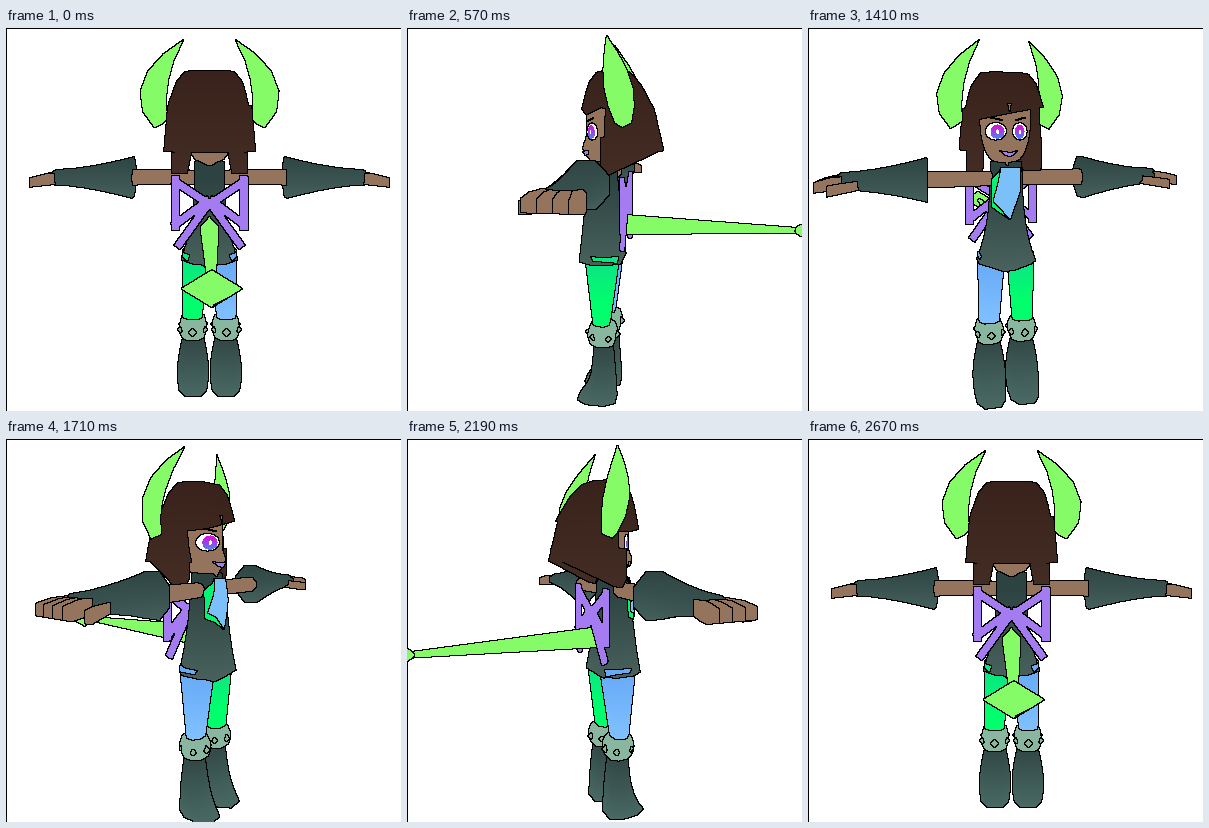
Animation of 395x383 px, one loop 2700 ms. Source, as an HTML page with a canvas:

```html
<!DOCTYPE html>
<html lang="en">
<head>
<meta charset="utf-8">
<title>Turntable</title>
<style>
html, body { margin: 0; width: 100%; height: 100%; overflow: hidden; background: #fff; }
canvas { display: block; width: 395px; height: 383px; }
</style>
</head>
<body>
<canvas id="stage" width="395" height="383"></canvas>
<script>
const W = 395, H = 383, STEPS = 45, STEP_MS = 60;
const AXIS = 200.7, HORIZON = 110, DISTANCE = 450;
const OFFSET = { x: 3.2, z: 5 };
const SIDES = [-1, 1];

const rgb = hex => [1, 3, 5].map(i => parseInt(hex.slice(i, i + 2), 16));
const lerp = (a, b, t) => a + (b - a) * t;
const clamp = t => Math.min(1, Math.max(0, t));
const steps = (n, f) => Array.from({ length: n + 1 }, (_, i) => f(i / n));

// ---- Paints: vertical gradients in model space ----
const paints = [];
function paint(top, bottom = top, y0 = 0, y1 = 1) {
  return paints.push({ top: rgb(top), bottom: rgb(bottom), y0, y1 }) - 1;
}
const SKIN = paint('#94745c');
const HAIR = paint('#38221b', '#432c23', 45, 140);
const LIME = paint('#86fb68');
const TEAL = paint('#2d4341', '#49625d', 150, 235);
const CUFF = paint('#2f4644', '#47625e', 130, 172);
const BOOT = paint('#324846', '#4b6c66', 308, 366);
const GREEN = paint('#0ce484', '#00ff6c', 228, 268);
const BLUE = paint('#68aaf6', '#80c2ff', 228, 290);
const CHEST_GREEN = paint('#00f572');
const CHEST_BLUE = paint('#7cc0fa');
const METAL = paint('#88b69e');
const PURPLE = paint('#a57bf2');
const WHITE = paint('#ffffff');
const IRIS = paint('#d317dc', '#4a86f2', 99, 110);
const INK = paint('#000000');

// ---- Mesh building ----
const mesh = [];
let part = 0;

function add(color, ...pts) {
  mesh.push({ color, part, pts });
}

function loft(color, rings, { separate = true, capped = true } = {}) {
  if (separate) part++;
  for (let r = 1; r < rings.length; r++) {
    const a = rings[r - 1], b = rings[r];
    a.forEach((p, i) => {
      const j = (i + 1) % a.length;
      add(color, p, a[j], b[i]);
      add(color, a[j], b[j], b[i]);
    });
  }
  if (!capped) return;
  for (const ring of [rings[0], rings[rings.length - 1]]) {
    for (let i = 2; i < ring.length; i++) add(color, ring[0], ring[i - 1], ring[i]);
  }
}

const sweep = (color, n, ringAt, options) => loft(color, steps(n, ringAt), options);

// Horizontal octagon
function slab(y, w, front, back, cx = 0, flat = .55) {
  const f = lerp(back, front, .72), b = lerp(back, front, .28), n = w * flat;
  return [[n, front], [w, f], [w, b], [n, back], [-n, back], [-w, b], [-w, f], [-n, front]]
    .map(([x, z]) => [cx + x, y, z]);
}

// Octagon across a limb that runs along x
function limb(x, ry, rz) {
  return steps(7, t => {
    const a = (t * 7 + .5) * Math.PI / 4;
    return [x, 150 + ry * 1.06 * Math.sin(a), rz * 1.06 * Math.cos(a)];
  });
}

// Diamonds across a vertical and a depth axis
const flatDiamond = (x, y, z, r) => [[x + r, y, z], [x, y, z + r], [x - r, y, z], [x, y, z - r]];
const uprightDiamond = (z, rx, ry) => [[rx, 197, z], [0, 197 + ry, z], [-rx, 197, z], [0, 197 - ry, z]];

const box = (x, y0, y1, z0, z1) => [[x, y0, z0], [x, y1, z0], [x, y1, z1], [x, y0, z1]];

// Lays a flat outline over a surface, finely enough to follow its bends
function decal(color, outline, surface, lift, separate = true) {
  const dense = outline.flatMap(([x, y], i) => {
    const [nx, ny] = outline[(i + 1) % outline.length];
    return steps(3, t => [lerp(x, nx, t * .75), lerp(y, ny, t * .75)]);
  });
  const middle = axis => outline.reduce((sum, p) => sum + p[axis], 0) / outline.length;
  const cx = middle(0), cy = middle(1);
  sweep(color, 4, t => dense.map(p => {
    const x = lerp(cx, p[0], t), y = lerp(cy, p[1], t);
    return [x, y, surface(x, y) + lift];
  }), { separate, capped: false });
}

const ellipse = (cx, cy, rx, ry) => steps(11, t => {
  const a = t * 11 / 6 * Math.PI;
  return [cx + rx * Math.cos(a), cy + ry * Math.sin(a)];
});

// Torso and chest
const torsoAt = y => {
  const t = clamp((y - 134) / 97);
  return { w: 15 + 13 * t ** 3, front: 9 + 11 * t ** .6, back: -12 - 9 * t };
};
const torsoRing = y => {
  const { w, front, back } = torsoAt(y);
  return slab(y, w, front, back, 0, .7);
};
loft(TEAL, [...steps(8, t => torsoRing(lerp(134, 231, t))), slab(239, 10, 10, -10)]);
const chestZ = (x, y) => {
  const { w, front, back } = torsoAt(y);
  return lerp(front, lerp(back, front, .72), clamp((Math.abs(x) / w - .7) / .3));
};
decal(CHEST_GREEN, [[16, 150], [7, 139], [0, 140], [0, 188], [16, 177]], chestZ, 1.5);
decal(CHEST_BLUE, [[8, 139], [-11, 139], [-11, 160], [0, 188], [15, 171]], chestZ, 3);

// Face: a wedge that bulges at the mouth and narrows to the chin
const faceAt = y => {
  const t = clamp((y - 78) / 59);
  const muzzle = Math.exp(-(((t - .73) / .13) ** 2));
  return { w: 4 + 22 * Math.sqrt(1 - t ** 3), front: 17 + 5 * muzzle - 6 * t ** 6, side: -3 };
};
const faceZ = (x, y) => {
  const { w, front, side } = faceAt(y);
  return lerp(front, side, Math.abs(x) / w);
};
sweep(SKIN, 12, t => {
  const y = lerp(78, 137, t), { w, front, side } = faceAt(y);
  return [[0, y, front], [w, y, side], [w * .7, y, -16], [-w * .7, y, -16], [-w, y, side]];
});
for (const s of SIDES) {
  const x = s * 12;
  decal(WHITE, ellipse(x, 104, 9.3, 8.6), faceZ, 1.2);
  decal(IRIS, ellipse(x - s, 104, 6, 7), faceZ, 1.8, false);
  decal(WHITE, ellipse(x - s, 104, 1.2, 2.4), faceZ, 2.4, false);
  decal(INK, [[s * 6, 93], [s * 18, 90], [s * 18, 90.8], [s * 6, 94]], faceZ, 2);
}
const lip = sag => t => [lerp(-9, 9, t), 122.5 + sag * Math.sin(Math.PI * t)];
decal(PURPLE, [...steps(4, lip(1.5)), ...steps(4, lip(6)).reverse()], faceZ, 1.5);

// Hair: cap with a slanted fringe, lower back, side locks
sweep(HAIR, 4, t => slab(lerp(46, 87, t), 24 + 15 * t ** .5, 4 + 13 * t ** .5, -28 - 25 * t ** .7)
  .map(([x, y, z]) => [x, y + x * .2 * t * t, z]));
sweep(HAIR, 2, t => slab(lerp(80, 123, t), lerp(39, 42, t), -5, lerp(-50, -60, t)), { separate: false });
const lock = (x, xBack) => [[x, 110, -5], [x, 138, -5], [x, 146, -10], [xBack, 123, -58], [xBack, 110, -58]];
for (const s of SIDES) loft(HAIR, [lock(s * 22, s * 16), lock(s * 38, s * 23)], { separate: false });

// Horns: a quadratic curve with a width that swells and then closes
const curve = (a, b, c, t) => lerp(lerp(a, b, t), lerp(b, c, t), t);
const slope = (a, b, c, t) => lerp(b - a, c - b, t);
for (const s of SIDES) {
  sweep(LIME, 5, t => {
    const x = curve(46, 69, 25, t), y = curve(97, 62, 12, t), z = -27 + 19 * t * t;
    const dx = slope(46, 69, 25, t), dy = slope(97, 62, 12, t), len = Math.hypot(dx, dy);
    const r = 13 * Math.sin(Math.PI * (.2 + .8 * t)), nx = -dy / len * r, ny = dx / len * r;
    return [[s * (x + nx), y + ny, z], [s * x, y, z + r], [s * (x - nx), y - ny, z], [s * x, y, z - r]];
  });
}

// Arms, cuffs, hands
for (const s of SIDES) {
  sweep(SKIN, 1, t => limb(s * lerp(15, 82, t), 7 + t, 7 + t));
  sweep(CUFF, 5, t => limb(s * lerp(77, 155, t), 7.5 + 13.5 * (1 - t) ** 1.6, 20 - 5 * t));
  for (let finger = -2; finger < 2; finger++) {
    sweep(SKIN, 2, t => {
      const width = 7.5 + 3.2 * Math.sqrt(t);
      return box(s * lerp(152, 173.5, t), 145 + 4 * t * t, 156 + 2 * t, finger * width, (finger + 1) * width);
    });
  }
  sweep(SKIN, 2, t => box(s * lerp(138, 162, t), 149 + 3 * t, 157 + 4 * t, 10 + 9 * t, 18 + 9 * t));
}

// Legs, anklets with studs, boots
for (const s of SIDES) {
  sweep(s < 0 ? GREEN : BLUE, 4, t =>
    slab(lerp(224, 296, t), lerp(12.5, 9.5, t), 14 - 9 * t, -19 + 10 * t, s * lerp(14.5, 17, t)));
  sweep(METAL, 4, t => {
    const r = 11 + 2.5 * Math.sin(Math.PI * t);
    return slab(lerp(290, 309, t), r, r - 3, -r - 3, s * 16.5);
  });
  for (let i = 0; i < 6; i++) {
    const a = i * Math.PI / 3, x = s * 16.5 + 13 * Math.sin(a), z = -3 - 13.5 * Math.cos(a);
    sweep(METAL, 2, t => flatDiamond(x, lerp(296, 304, t), z, 4 * Math.sin(Math.PI * t)));
  }
  sweep(BOOT, 6, t =>
    slab(lerp(307, 363, t), 9.5 + 6 * Math.sin(.75 * Math.PI * t), 5 + 16 * t ** 3, -12 - 4 * t, s * 16.5));
}

// Bow on the back
part++;
function bar(x1, y1, x2, y2, width = 7.5) {
  const len = Math.hypot(x2 - x1, y2 - y1);
  const nx = (y2 - y1) / len * width / 2, ny = (x1 - x2) / len * width / 2;
  sweep(PURPLE, 1, t => {
    const z = -26 + 4 * t;
    return [[x1 + nx, y1 + ny, z], [x2 + nx, y2 + ny, z], [x2 - nx, y2 - ny, z], [x1 - nx, y1 - ny, z]];
  }, { separate: false });
}
for (const s of SIDES) {
  bar(s * 33, 147, s * 33, 199);
  bar(s * 35, 151, 0, 174);
  bar(s * 35, 195, 0, 169);
  bar(0, 172, s * 31, 215);
}

// Tail and its tip
sweep(LIME, 1, t => uprightDiamond(lerp(-12, -190, t), lerp(9.5, 2.5, t), lerp(10.5, 2.5, t)));
loft(LIME, [uprightDiamond(-180, 0, 0), uprightDiamond(-196, 18, 11), uprightDiamond(-220, 0, 0)]);

// ---- Renderer ----
const ctx = document.getElementById('stage').getContext('2d');
const image = ctx.createImageData(W, H);
const depth = new Float32Array(W * H);
const owner = new Uint16Array(W * H);
const colour = new Uint8Array(W * H);

function project([px, y, pz], sin, cos) {
  const x = px + OFFSET.x, z = pz + OFFSET.z;
  const scale = DISTANCE / (DISTANCE + x * sin + z * cos);
  return [AXIS + (x * cos - z * sin) * scale, HORIZON + (y - HORIZON) * scale, scale];
}

function fillTriangle([a, b, c], tri) {
  const area = (b[0] - a[0]) * (c[1] - a[1]) - (b[1] - a[1]) * (c[0] - a[0]);
  if (Math.abs(area) < 1e-6) return;
  const x0 = Math.max(0, Math.floor(Math.min(a[0], b[0], c[0])));
  const x1 = Math.min(W - 1, Math.ceil(Math.max(a[0], b[0], c[0])));
  const y0 = Math.max(0, Math.floor(Math.min(a[1], b[1], c[1])));
  const y1 = Math.min(H - 1, Math.ceil(Math.max(a[1], b[1], c[1])));
  for (let y = y0; y <= y1; y++) {
    for (let x = x0; x <= x1; x++) {
      const px = x + .5, py = y + .5;
      const u = ((px - a[0]) * (c[1] - a[1]) - (py - a[1]) * (c[0] - a[0])) / area;
      const v = ((b[0] - a[0]) * (py - a[1]) - (b[1] - a[1]) * (px - a[0])) / area;
      if (u < 0 || v < 0 || u + v > 1) continue;
      const d = a[2] + u * (b[2] - a[2]) + v * (c[2] - a[2]), i = y * W + x;
      if (d <= depth[i]) continue;
      depth[i] = d;
      owner[i] = tri.part;
      colour[i] = tri.color;
    }
  }
}

// Outlines fall where parts meet or the depth jumps
const differs = (i, j) => owner[i] !== owner[j] || Math.abs(depth[i] - depth[j]) > .08;

function shade(x, y) {
  const i = y * W + x;
  if ((x < W - 1 && differs(i, i + 1)) || (y < H - 1 && differs(i, i + W)) ||
      (x < W - 1 && y < H - 1 && differs(i, i + W + 1))) return [0, 0, 0];
  if (!owner[i]) return x && y ? [255, 255, 255] : [0, 0, 0];
  const p = paints[colour[i]];
  const modelY = HORIZON + (y - HORIZON) / depth[i];
  const t = clamp((modelY - p.y0) / (p.y1 - p.y0));
  return p.top.map((v, n) => lerp(v, p.bottom[n], t));
}

function render(step) {
  const angle = step / STEPS * Math.PI * 2, sin = Math.sin(angle), cos = Math.cos(angle);
  depth.fill(0);
  owner.fill(0);
  for (const tri of mesh) fillTriangle(tri.pts.map(p => project(p, sin, cos)), tri);
  for (let y = 0, o = 0; y < H; y++) {
    for (let x = 0; x < W; x++, o += 4) {
      const [r, g, b] = shade(x, y);
      image.data[o] = r;
      image.data[o + 1] = g;
      image.data[o + 2] = b;
      image.data[o + 3] = 255;
    }
  }
  ctx.putImageData(image, 0, 0);
}

let shown = -1;
function tick() {
  const step = Math.floor((performance.now() + STEP_MS / 2) / STEP_MS) % STEPS;
  if (step !== shown) render(shown = step);
  requestAnimationFrame(tick);
}
tick();
</script>
</body>
</html>
```
